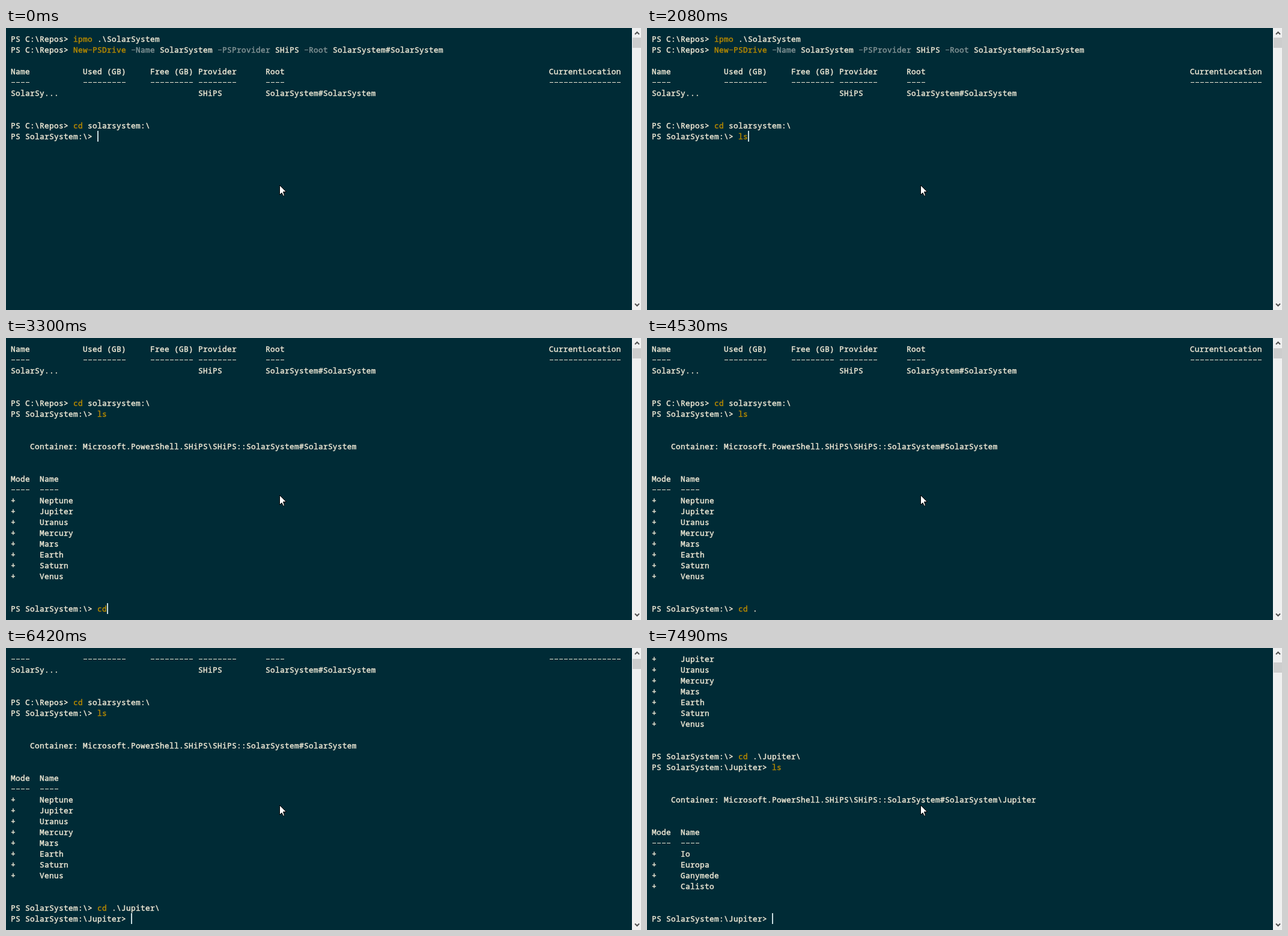
Animation of 1057x469 px, one loop 8000 ms. Source, as an HTML page:

```html
<!DOCTYPE html>
<html lang="en">
<head>
<meta charset="utf-8">
<title>Terminal</title>
<style>
html, body { margin: 0; width: 100%; height: 100%; overflow: hidden; background: #002b36; }
#stage { position: relative; width: 1057px; height: 469px; overflow: hidden; }
#screen {
  position: absolute; left: 8px; top: 9px; width: 1034px;
  font: 500 12.8px/18px "Noto Sans Mono", "DejaVu Sans Mono", monospace;
  letter-spacing: .32px; color: #eee8d5; white-space: pre; font-variant-ligatures: none;
  -webkit-text-stroke: .45px;
}
#screen div { height: 18px; }
#screen b { font-weight: 500; color: #b58900; }
#screen u { text-decoration: none; color: #839496; }
/* long dashes, one per cell */
#screen i {
  display: inline-block; height: 18px; vertical-align: top; font-style: normal;
  -webkit-text-fill-color: transparent; -webkit-text-stroke: 0;
  background: linear-gradient(90deg, transparent 1px, currentColor 1px 7px, transparent 7px) 0 9px / 8px 1px repeat-x;
}
#caret { position: absolute; width: 2px; height: 18px; background: #c8dce0; }
#bar {
  position: absolute; left: 1042px; top: 0; width: 14px; height: 469px;
  background: #f0f0f0; border-left: 1px solid #fff;
}
#thumb { position: absolute; left: 0; width: 14px; height: 17px; background: #cdcdcd; }
svg { position: absolute; left: 0; top: 0; }
</style>
</head>
<body>
<div id="stage">
  <div id="screen"></div>
  <div id="caret"></div>
  <div id="bar"><div id="thumb"></div></div>
  <svg width="1057" height="469">
    <path d="M1047 10.5l3.5-3.5 3.5 3.5M1047 458.5l3.5 3.5 3.5-3.5" fill="none" stroke="#505050" stroke-width="2"/>
    <path d="M455.5 261.5v16l3.5-3.5 2.5 5.5 2-1-2-6h5z" fill="#fff" stroke="#000"/>
  </svg>
</div>
<script>
const $ = id => document.getElementById(id);
const CELL = 8, ROW = 18, LOOP = 8000;
const STOPS = [0, 15, 29, 39, 53, 112];

const columns = cells => cells.reduce((line, cell, i) => line.padEnd(STOPS[i]) + cell, '');
const rule = text => '-'.repeat(text.length);
const listing = (path, names) => [
  '', '', String.raw`    Container: Microsoft.PowerShell.SHiPS\SHiPS::` + path, '', '',
  'Mode  Name', '----  ----', ...names.split(' ').map(name => '+     ' + name), '', ''
];

const heads = ['Name', 'Used (GB)', 'Free (GB)', 'Provider', 'Root', 'CurrentLocation'];
const home = 'PS C:\\Repos> ', solar = 'PS SolarSystem:\\> ', jupiter = 'PS SolarSystem:\\Jupiter> ';
const lines = [
  home + 'ipmo .\\SolarSystem',
  home + 'New-PSDrive -Name SolarSystem -PSProvider SHiPS -Root SolarSystem#SolarSystem',
  '', columns(heads), columns(heads.map(rule)),
  columns(['SolarSy...', '', '', 'SHiPS', 'SolarSystem#SolarSystem']), '', '',
  home + 'cd solarsystem:\\',
  solar + 'ls',
  ...listing('SolarSystem#SolarSystem', 'Neptune Jupiter Uranus Mercury Mars Earth Saturn Venus'),
  solar + 'cd .\\Jupiter\\',
  jupiter + 'ls',
  ...listing('SolarSystem#SolarSystem\\Jupiter', 'Io Europa Ganymede Calisto')
];

// One prompt per entry: line index, lines scrolled away, thumb top,
// and key steps as [time, typed text, caret hidden].
const prompts = [
  { at: 9, scroll: 0, thumb: 16, text: solar, keys: [
    [0, ''], [290, '', 1], [830, ''], [910, 'l'], [990, 'ls'], [1520, 'ls', 1], [2080, 'ls']] },
  { at: 27, scroll: 3, thumb: 17, text: solar, keys: [
    [2200, ''], [2740, '', 1], [3120, 'c'], [3300, 'cd'], [3430, 'cd '],
    [3990, 'cd .'], [4530, 'cd .', 1], [4740, 'cd .\\'], [5220, 'cd .\\', 1],
    [5530, 'cd .\\j'], [5680, 'cd .\\ju'], [5820, 'cd .\\jup'], [5960, 'cd .\\Jupiter\\']] },
  { at: 28, scroll: 4, thumb: 18, text: jupiter, keys: [
    [6420, ''], [6960, '', 1], [7040, 'l'], [7200, 'ls']] },
  { at: 42, scroll: 18, thumb: 24, text: jupiter, keys: [[7490, '']] }
];
const steps = prompts.flatMap(prompt =>
  prompt.keys.map(([time, typed, hidden]) => ({ prompt, time, typed, hidden })));

function markup(line) {
  const html = line
    .replace(/^(PS \S+> )(\S+)(.*)$/, (_, head, command, rest) =>
      head + '<b>' + command + '</b>' + rest.replace(/ (-\w+)/g, ' <u>$1</u>'))
    .replace(/-+/g, '<i>$&</i>');
  return '<div>' + html + '</div>';
}

function show({ prompt, typed, hidden }) {
  const { at, scroll, thumb, text } = prompt;
  const line = text + typed;
  $('screen').innerHTML = [...lines.slice(scroll, at), line].map(markup).join('');
  $('caret').style.left = 8 + line.length * CELL + 'px';
  $('caret').style.top = 9 + (at - scroll) * ROW + 'px';
  $('caret').style.visibility = hidden ? 'hidden' : 'visible';
  $('thumb').style.top = thumb + 'px';
}

let shown;
const start = performance.now();
function tick() {
  const time = (performance.now() - start) % LOOP;
  const step = steps.findLast(s => s.time <= time);
  if (step !== shown) show(shown = step);
  requestAnimationFrame(tick);
}
tick();
</script>
</body>
</html>
```
